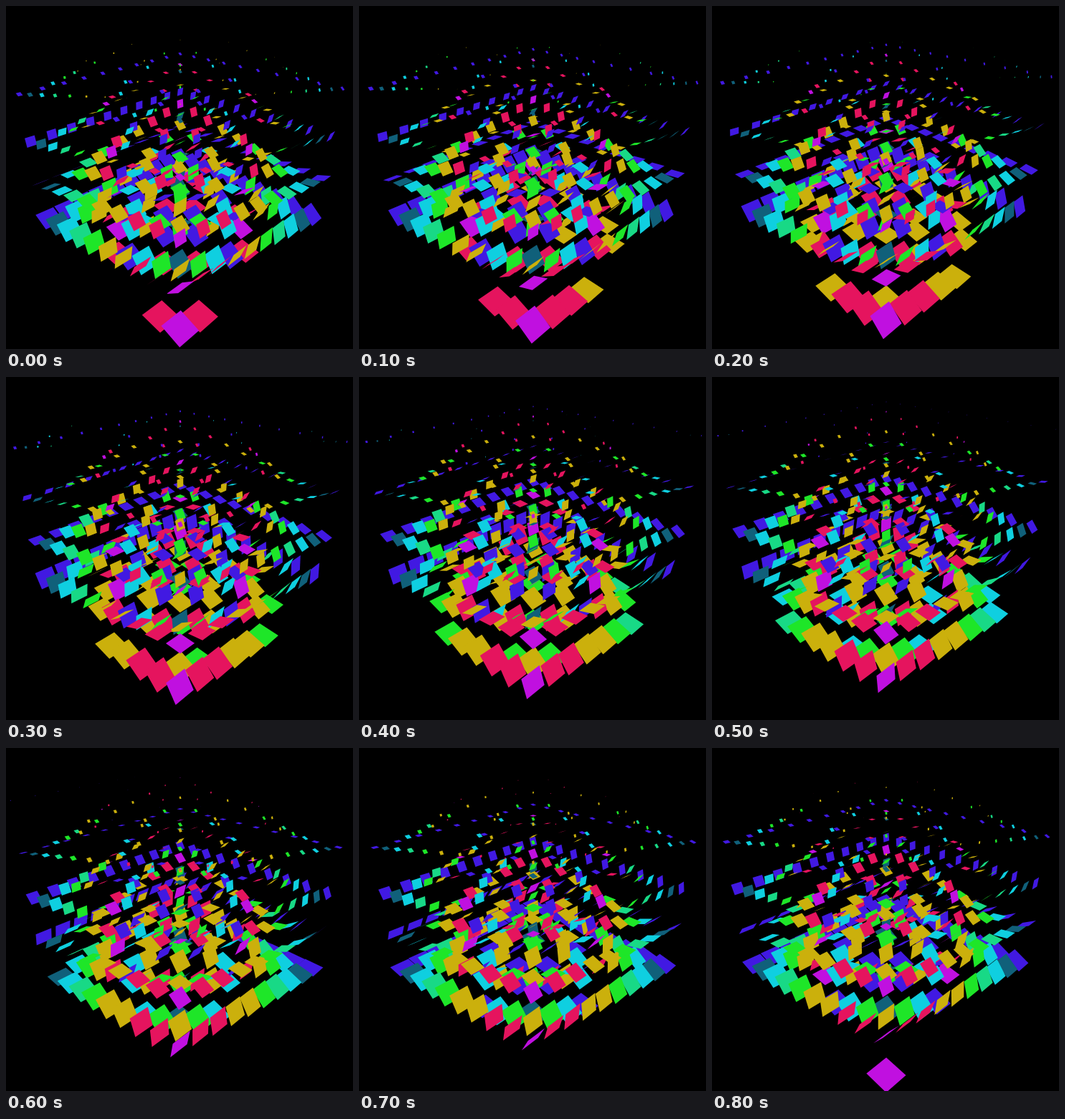
An HTML page with a canvas for the animation above (0.9 s loop, 484 px wide and 479 px high).

```html
<!DOCTYPE html>
<html lang="en">
<head>
<meta charset="utf-8">
<title>Rising multiplication table</title>
<style>
html, body { margin: 0; width: 100%; height: 100%; overflow: hidden; background: #000; }
canvas { display: block; }
</style>
</head>
<body>
<canvas id="stage" width="484" height="479"></canvas>
<script>
const ctx = document.getElementById('stage').getContext('2d');

const SIZE = 10;        // the table runs from 1x1 to 10x10
const STEPS = 9;        // pictures per loop
const STEP_MS = 100;
const LAYERS = 4;
const LIFE = STEPS * LAYERS;
const RISE = 0.232;     // cells climbed per step
const SPIN = 2 * Math.PI / 27;
const H = Math.SQRT1_2;

// Colour by the last digit of the product.
const COLORS = ['#4119e2', '#c010e0', '#e5145e', '#e5145e', '#cbb00c',
                '#cbb00c', '#1ee628', '#18d986', '#0fcfe0', '#10607a'];

// x: right, d: away from the viewer, h: up; all in cells.
function project(x, d, h) {
  const depth = 1 + 0.0447 * d - 0.0297 * h;
  return {
    x: 243 + 28.2 * x / depth,
    y: (306.9 - 3.3 * d - 30.86 * h) / depth,
    depth
  };
}

function makeTile(i, j, layer, step) {
  const product = (i + 1) * (j + 1);
  const delay = 0.9 * ((product - 1) % 10) + 0.028 * i - 0.085 * j;
  const age = (step + 0.45 - delay + STEPS * layer + LIFE) % LIFE;
  const half = (1 - age / LIFE) / 2;
  const cos = Math.cos(age * SPIN), sin = Math.sin(age * SPIN);
  const x = (j - i) * H, d = (i + j - SIZE + 1) * H, h = age * RISE;

  // u runs along the spin axis, w across it.
  const corner = (u, w) => project(
    x + half * H * (u - w * cos),
    d + half * H * (u + w * cos),
    h + half * w * sin
  );
  return {
    depth: project(x, d, h).depth,
    color: COLORS[product % 10],
    points: [corner(-1, -1), corner(1, -1), corner(1, 1), corner(-1, 1)]
  };
}

function draw(step) {
  const tiles = [];
  for (let layer = 0; layer < LAYERS; layer++)
    for (let i = 0; i < SIZE; i++)
      for (let j = 0; j < SIZE; j++)
        tiles.push(makeTile(i, j, layer, step));
  tiles.sort((a, b) => b.depth - a.depth);

  ctx.fillStyle = '#000';
  ctx.fillRect(0, 0, 484, 479);
  for (const { color, points } of tiles) {
    ctx.fillStyle = color;
    ctx.beginPath();
    for (const p of points) ctx.lineTo(p.x, p.y);
    ctx.fill();
  }
}

const start = performance.now();
function tick() {
  const elapsed = performance.now() - start;
  draw(Math.floor(elapsed / STEP_MS) % STEPS + 1);
  requestAnimationFrame(tick);
}
tick();
</script>
</body>
</html>
```
